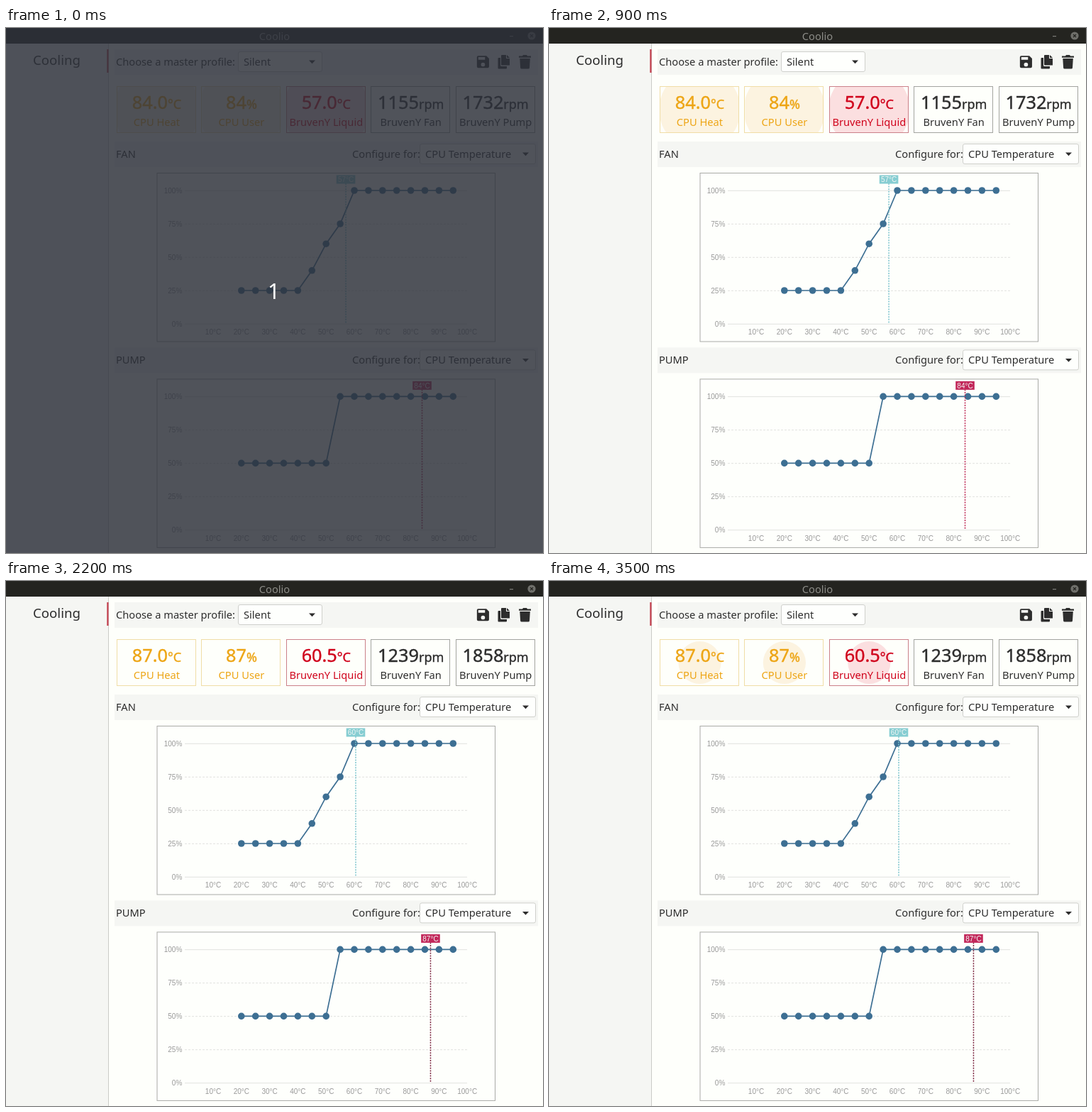
An HTML page for the animation above (3.6 s loop, 757 by 740 pixels).

```html
<!DOCTYPE html>
<html lang="en">
<head>
<meta charset="utf-8">
<title>Cooling dashboard</title>
<style>
  html, body { margin: 0; width: 100%; height: 100%; overflow: hidden; background: #fefffb; }
  svg { display: block; }
  text { font: 14.67px "Noto Sans", sans-serif; fill: #2d2d2d; white-space: pre; }
  .tick, .badge { font: 10px "Liberation Sans", Arial, sans-serif; fill: #999; }
  .badge { fill: #f4f7f5; }
  .value { font-size: 25.3px; stroke-width: .4; }
  .unit { font-size: 18px; }
</style>
</head>
<body>
<svg id="stage" width="757" height="740" viewBox="0 0 757 740"></svg>
<script>
const NS = "http://www.w3.org/2000/svg";
const stage = document.getElementById("stage");
const LOOP = 3600, STEP = 100, UPDATE_AT = 1100;
const INK = "#2d2d2d", PANEL = "#f5f6f3", CURVE = "#3d6f93";

function add(parent, tag, attrs = {}, content) {
  const node = document.createElementNS(NS, tag);
  for (const key in attrs) node.setAttribute(key, attrs[key]);
  if (content !== undefined) node.textContent = content;
  return parent.appendChild(node);
}
const rect = (x, y, width, height, fill, more) =>
  add(stage, "rect", { x, y, width, height, fill, ...more });
const path = (d, fill, more) => add(stage, "path", { d, fill, ...more });
const label = (x, y, content, more) => add(stage, "text", { x, y, ...more }, content);

function select(x, y, width, content) {
  rect(x + .5, y + .5, width, 28, "#fefffd", { rx: 2.5, stroke: "#cfd0cc" });
  label(x + 8, y + 20, content);
  path(`M${x + width - 18} ${y + 12.5}h9l-4.5 4.8z`, INK);
}

function drawWindow() {
  rect(0, 0, 757, 740, "#fefffb");
  rect(0, 22, 144, 718, PANEL);
  rect(144, 22, 1, 718, "#cbccc8");
  rect(142.3, 30, 2.2, 33, "#c43f4e");
  rect(0, 0, 757, 22, "#242420");
  label(378.5, 16.5, "Coolio", { "text-anchor": "middle", style: "fill:#8d8d88" });
  rect(710, 11, 5, 1.2, "#7d7d78");
  add(stage, "circle", { cx: 741, cy: 11, r: 5.6, fill: "#70706b" });
  path("M739 9l4 4m0-4l-4 4", "none", { stroke: "#242420", "stroke-width": 1.2 });
  label(38, 52, "Cooling", { style: "font-size:18.67px" });

  rect(153, 30, 597, 36, PANEL);
  label(155, 53, "Choose a master profile:");
  select(327, 33, 118, "Silent");
}

function drawIcons() {
  path("M17 3H5a2 2 0 0 0-2 2v14a2 2 0 0 0 2 2h14a2 2 0 0 0 2-2V7zM12 19a3 3 0 1 1 0-6 3 3 0 0 1 0 6zM15 9H5V5h10z",
    INK, { transform: "translate(661 36.3) scale(.95)", "fill-rule": "evenodd" });
  path("M699 38h6v5h5v9.500h-11a1 1 0 0 1-1-1V39a1 1 0 0 1 1-1zM706 38l4 4h-4z", INK);
  path("M697 42h-2.500a1 1 0 0 0-1 1v13.500a1 1 0 0 0 1 1h10.500a1 1 0 0 0 1-1V54h-7.500a1.500 1.500 0 0 1-1.500-1.500z", INK);
  path("M723 39.500h5l1-1.500h5l1 1.500h5v2.300h-17zM724.300 43h14.500l-.8 13a1.700 1.700 0 0 1-1.700 1.500h-9.500a1.700 1.700 0 0 1-1.700-1.500z", INK);
}

const WARM = { ink: "#eda515", edge: "#f0dda6", glow: "#fcf3e0" };
const HOT = { ink: "#d0021b", edge: "#cb8089", glow: "#fbdfe0" };
const CALM = { ink: INK, edge: "#a3a4a0" };

function makeCard(index, { name, unit, values, tone }) {
  const x = 157 + 119.4 * index, mid = x + 55.5;
  let ripple;
  if (tone.glow) {
    const inner = add(stage, "svg", { x, y: 82, width: 111, height: 65.5, overflow: "hidden" });
    ripple = add(inner, "circle", { cx: 55.5, cy: 33, fill: tone.glow });
  }
  rect(Math.round(x) - .5, 82.5, 111, 65, "none", { stroke: tone.edge });
  const color = `fill:${tone.ink};stroke:${tone.ink}`;
  const reading = label(mid, 114, "", { "text-anchor": "middle", class: "value", style: color });
  const number = add(reading, "tspan");
  add(reading, "tspan", { class: "unit" }, unit);
  label(mid, 138, name, { "text-anchor": "middle", style: `fill:${tone.ink}` });
  return (updated, radius) => {
    number.textContent = values[updated];
    if (ripple) ripple.setAttribute("r", radius);
  };
}

const tempX = temp => 252.2 + 3.98 * temp;

function makeChart(top, { title, duty, temps, badge, lines }) {
  const dutyY = percent => top + 257 - 1.88 * percent;
  rect(153, top, 597, 36, PANEL);
  label(155, top + 23, title);
  label(488, top + 23, "Configure for:");
  select(583, top + 3, 163, "CPU Temperature");
  rect(213, top + 44.5, 476.5, 237.5, "#fefffc", { stroke: "#a9aaa7" });

  for (let p = 0; p <= 100; p += 25) {
    path(`M252 ${dutyY(p) + .3}H650`, "none",
      { stroke: "#e1e2df", "stroke-dasharray": p % 100 ? "3 2" : "none" });
    label(248.3, dutyY(p) + 3.7, p + "%", { "text-anchor": "end", class: "tick" });
  }
  for (let t = 10; t <= 100; t += 10)
    label(tempX(t), top + 272.3, t + "°C", { "text-anchor": "middle", class: "tick" });

  const points = [];
  for (let t = 20; t <= 95; t += 5) points.push([tempX(t), dutyY(duty(t))]);
  add(stage, "polyline", { points: points.join(" "), fill: "none", stroke: CURVE, "stroke-width": 1.7 });
  for (const [cx, cy] of points) add(stage, "circle", { cx, cy, r: 4.8, fill: CURVE });

  const marker = add(stage, "g");
  const line = add(marker, "path", { d: `M0 ${top + 59}V${top + 257}`, "stroke-width": 1.5, "stroke-dasharray": "2 1.6" });
  add(marker, "rect", { x: -13.3, y: top + 47.5, width: 26.6, height: 12, fill: badge });
  const text = add(marker, "text", { x: 0, y: top + 57.2, "text-anchor": "middle", class: "badge" });
  return updated => {
    marker.setAttribute("transform", `translate(${tempX(temps[updated])} 0)`);
    line.setAttribute("stroke", lines[updated]);
    text.textContent = Math.floor(temps[updated]) + "°C";
  };
}

function fanDuty(temp) {
  if (temp <= 40) return 25;
  return { 45: 40, 50: 60, 55: 75 }[temp] || 100;
}

drawWindow();
drawIcons();
const cards = [
  { name: "CPU Heat", unit: "°C", values: ["84.0", "87.0"], tone: WARM },
  { name: "CPU User", unit: "%", values: ["84", "87"], tone: WARM },
  { name: "BruvenY Liquid", unit: "°C", values: ["57.0", "60.5"], tone: HOT },
  { name: "BruvenY Fan", unit: "rpm", values: ["1155", "1239"], tone: CALM },
  { name: "BruvenY Pump", unit: "rpm", values: ["1732", "1858"], tone: CALM }
].map((card, i) => makeCard(i, card));
const charts = [
  makeChart(160, { title: "FAN", duty: fanDuty, temps: [57, 60.5],
    badge: "#86cdd2", lines: ["#7cc4ce", "#7cc4ce"] }),
  makeChart(450.4, { title: "PUMP", duty: t => t <= 50 ? 50 : 100, temps: [84, 87],
    badge: "#c2275a", lines: ["#bd2854", "#7c2440"] })
];
const countdown = add(stage, "g");
add(countdown, "rect", { width: 757, height: 740, fill: "rgb(45,49,58)", "fill-opacity": .83 });
add(countdown, "text", { x: 377.5, y: 381.500, "text-anchor": "middle", style: "font-size:30px;fill:#fff" }, "1");

// The glow grows once a second, slowing toward its full size, then restarts.
function glowRadius(time) {
  const progress = Math.min(1, ((time + 800) % 1000) / 930);
  return 62 * Math.sin(progress * Math.PI / 2);
}

function render(time) {
  const updated = time >= UPDATE_AT ? 1 : 0;
  cards.forEach(update => update(updated, glowRadius(time)));
  charts.forEach(update => update(updated));
  countdown.setAttribute("visibility", time < STEP ? "visible" : "hidden");
}

let start;
function tick(now) {
  start ??= now;
  render(Math.floor(((now - start) % LOOP) / STEP) * STEP);
  requestAnimationFrame(tick);
}
render(0);
requestAnimationFrame(tick);
</script>
</body>
</html>
```
